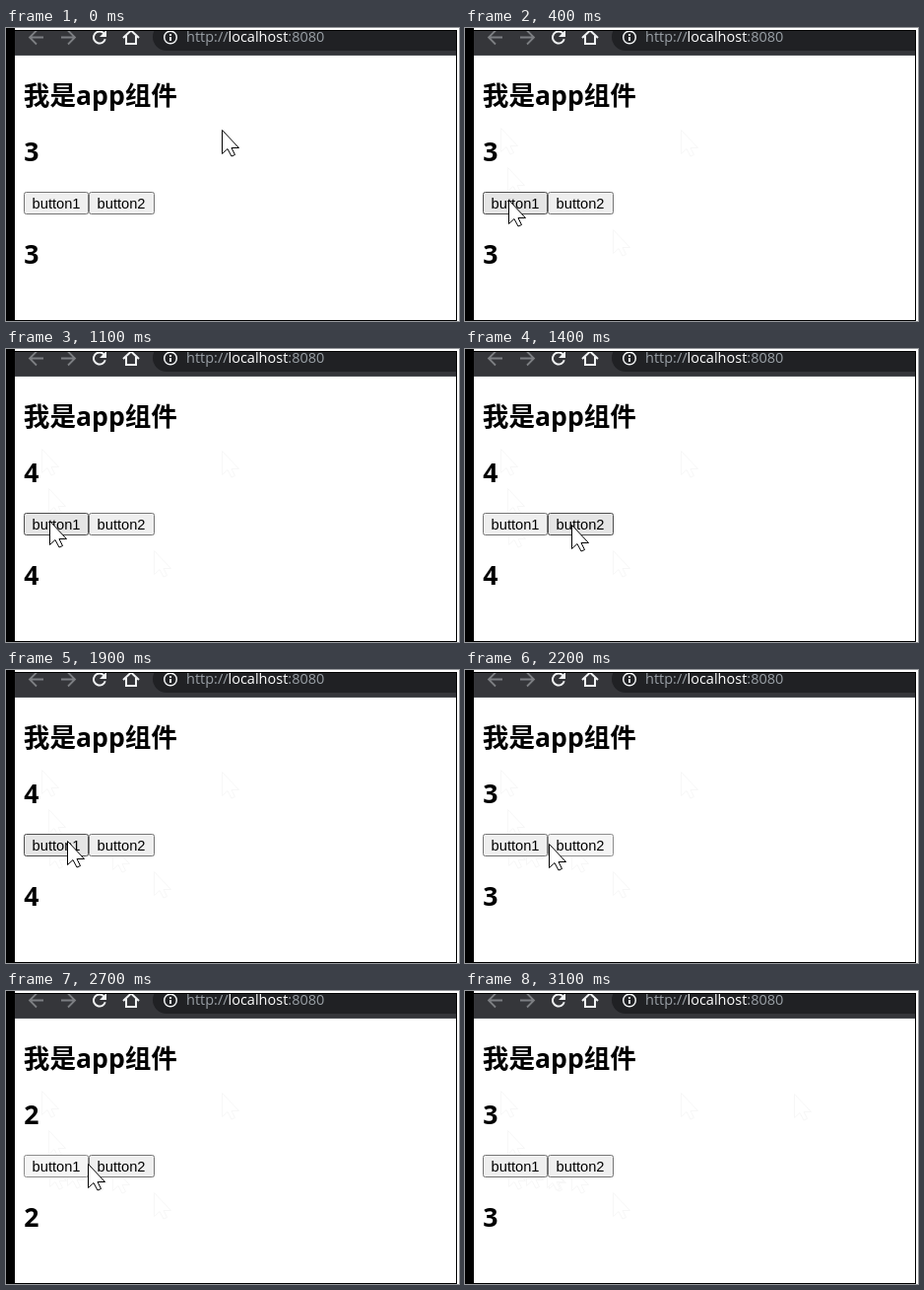
An HTML page with a canvas for the animation above (3.2 s loop, 460 px wide and 297 px high).

```html
<!DOCTYPE html>
<html lang="zh-CN">
<head>
<meta charset="utf-8">
<title>Counter demo</title>
<style>
html, body { margin: 0; width: 100%; height: 100%; overflow: hidden; background: #fff; }
canvas { display: block; }
</style>
</head>
<body>
<canvas id="stage" width="460" height="297"></canvas>
<script>
const ctx = document.getElementById('stage').getContext('2d');
const LOOP = 3200, STEP = 100, HIDE_AT = 3100;
const HEAD = "bold 26.6px 'Open Sans', 'Noto Sans CJK SC', 'Noto Sans CJK', sans-serif";
const URL_FONT = "14.5px 'Open Sans', sans-serif";
const BUTTON_FONT = "14.667px 'Liberation Sans', Arial, sans-serif";
const LIGHT = '#f1f3f4', GREY = '#9aa0a6', DIM = '#7d7f83';

// The pointer jumps to each stop and rests there
const stops = [
  { at: 0, x: 219, y: 103 },
  { at: 100, x: 150, y: 204 },
  { at: 200, x: 43, y: 141 },
  { at: 300, x: 36, y: 101 },
  { at: 400, x: 44, y: 174 },
  { at: 1200, x: 108, y: 178 },
  { at: 1700, x: 62, y: 173 },
  { at: 2100, x: 85, y: 176 },
  { at: 2600, x: 83, y: 175 },
  { at: 2900, x: 334, y: 104 },
  { at: 3000, x: 425, y: 46 }
];
// Releases of the mouse; a button stays pressed for one step before
const clicks = [700, 1600, 1900, 2100, 2300, 2800];

const buttons = [
  { label: 'button1', x: 18, w: 66, add: 1 },
  { label: 'button2', x: 84, w: 67, add: -1 }
];
const styles = {
  normal: ['#efefef', '#767676'],
  hover: ['#e5e5e5', '#4f4f4f'],
  active: ['#f5f5f5', '#8d8d8d']
};

const stopAt = t => stops.filter(s => s.at <= t).pop();
const isOver = (b, p) => p.x >= b.x && p.x < b.x + b.w && p.y >= 166 && p.y < 189;

function countAt(t) {
  return clicks.filter(c => c <= t).reduce((sum, c) => {
    const hit = buttons.find(b => isOver(b, stopAt(c)));
    return sum + hit.add;
  }, 3);
}

function stateAt(button, t) {
  if (t >= HIDE_AT || !isOver(button, stopAt(t))) return 'normal';
  return clicks.some(c => t >= c - STEP && t < c) ? 'active' : 'hover';
}

function rect(x, y, w, h, color) {
  ctx.fillStyle = color;
  ctx.fillRect(x, y, w, h);
}

function text(str, x, y, font, color) {
  ctx.font = font;
  ctx.fillStyle = color;
  ctx.fillText(str, x, y);
  return x + ctx.measureText(str).width;
}

function stroke(path, color, width, fill) {
  if (fill) {
    ctx.fillStyle = fill;
    ctx.fill(path);
  }
  ctx.strokeStyle = color;
  ctx.lineWidth = width;
  ctx.stroke(path);
}

function circle(x, y, r, color, width, from = 0, to = Math.PI * 2) {
  const path = new Path2D();
  path.arc(x, y, r, from, to);
  stroke(path, color, width);
}

function drawArrow(x, dir) {
  const tip = x + 7 * dir;
  stroke(new Path2D(`M${x - 7 * dir} 9.5H${tip}M${x} 2.5L${tip} 9.5L${x} 16.5`), DIM, 1.8);
}

function drawToolbar() {
  ctx.save();
  ctx.beginPath();
  ctx.rect(9, 3, 448, 25);
  ctx.clip();
  rect(9, 3, 448, 24, '#35363a');
  rect(9, 27, 448, 1, '#494c50');

  ctx.fillStyle = '#202124';
  ctx.beginPath();
  ctx.roundRect(149, -5, 340, 28, 14);
  ctx.fill();

  drawArrow(31, -1);
  drawArrow(63, 1);

  circle(95, 9.5, 6, LIGHT, 2, 0.3, 5.5);
  ctx.fillStyle = LIGHT;
  ctx.fill(new Path2D('M102 2v7h-7z'));

  stroke(new Path2D('M119 10l8-7.5l8 7.5M122 8v8h10v-8'), LIGHT, 2);

  circle(167, 9.5, 6.3, LIGHT, 1.5);
  rect(166, 9, 2, 4, LIGHT);
  rect(166, 6, 2, 2, LIGHT);

  let x = text('http://', 183, 14, URL_FONT, GREY);
  x = text('localhost', x, 14, URL_FONT, '#fff');
  text(':8080', x, 14, URL_FONT, GREY);
  ctx.restore();
}

function drawButton({ label, x, w }, state) {
  const [fill, border] = styles[state];
  const box = new Path2D();
  box.roundRect(x + 0.5, 166.5, w - 1, 22, 2);
  stroke(box, border, 1, fill);
  text(label, x + 8.6, 183, BUTTON_FONT, '#000');
}

function drawPointer({ x, y }, color) {
  ctx.save();
  ctx.translate(x + 0.5, y + 0.5);
  stroke(new Path2D('M0 0v24l5.5-5l4 7.5l3.5-1.5l-3.5-7h7.5z'), color, 1, '#fff');
  ctx.restore();
}

function draw(t) {
  const now = stopAt(t);
  rect(0, 0, 460, 297, '#fff');

  // Faint trail left behind at earlier stops
  stops.filter(s => s.at < now.at).forEach(s => drawPointer(s, '#f7f7f7'));

  rect(0, 0, 9, 297, '#000');
  rect(9, 2, 449, 1, '#000');
  rect(457, 2, 1, 295, '#000');
  rect(9, 296, 449, 1, '#000');
  drawToolbar();

  text('我是app组件', 17.8, 78, HEAD, '#000');
  for (const y of [135, 239]) text(countAt(t), 18.3, y, HEAD, '#000');
  for (const b of buttons) drawButton(b, stateAt(b, t));

  if (t < HIDE_AT) drawPointer(now, '#000');
}

function tick() {
  draw(Math.floor(performance.now() % LOOP / STEP) * STEP);
  requestAnimationFrame(tick);
}
tick();
</script>
</body>
</html>
```
